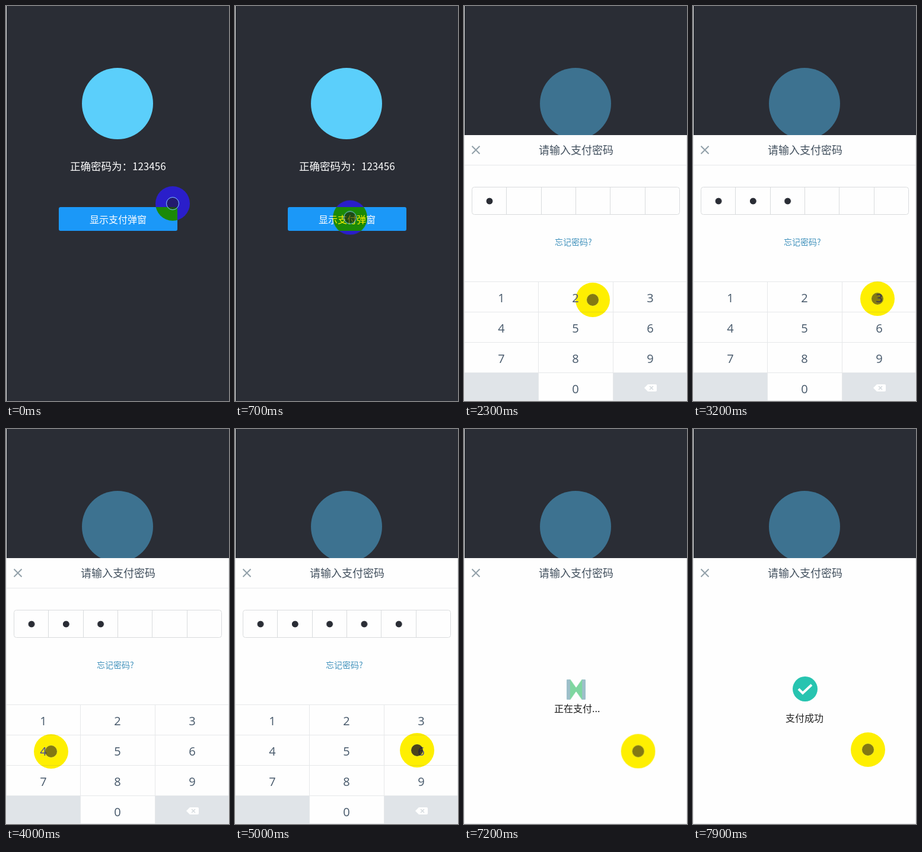
Write an HTML page that moves like this. It is 376 by 664 pixels and loops after 8000 ms.

```html
<!DOCTYPE html>
<html lang="zh-CN">
<head>
<meta charset="utf-8">
<title>支付密码</title>
<style>
html, body { margin: 0; width: 100%; height: 100%; overflow: hidden; background: #2a2d35; }
.stage {
  position: relative; width: 376px; height: 664px; overflow: hidden; isolation: isolate;
  background: #2a2d35; font-family: "Noto Sans CJK SC", "Noto Sans CJK", "Noto Sans", sans-serif;
}
.stage > *, .sheet > * { position: absolute; }
svg { left: 0; top: 0; display: block; }
.edge { left: 0; top: 0; width: 1px; height: 664px; background: #eceded; }
.mid { text-anchor: middle; }

.logo { fill: #5bcffb; animation: dim 8s linear infinite; }
@keyframes dim { 0%, 11.25% { fill: #5bcffb; } 13.5%, 100% { fill: #3d7290; } }

.sheet { inset: 0; animation: rise 8s infinite; }
@keyframes rise {
  0%, 11.25% { transform: translateY(447px); animation-timing-function: ease-out; }
  13.5%, 100% { transform: none; }
}
.line { fill: none; stroke: #e6e8ea; }
.keys { font: 20px "Open Sans", "Noto Sans", sans-serif; fill: #46586a; }

/* Each typed digit uncovers one more cell */
.dots {
  left: 14px; top: 322px; height: 12px;
  background: radial-gradient(circle at 29px 6px, #2a2d35 5px, transparent 5.8px) 0 0 / 58.3px 12px;
  animation: type 8s step-end infinite;
}
@keyframes type {
  0% { width: 0; }
  24.4% { width: 58.3px; }
  30.6% { width: 116.6px; }
  39.4% { width: 174.9px; }
  51.9% { width: 233.2px; }
  57.5% { width: 291.5px; }
  63.75%, 100% { width: 349.8px; }
}

.entry { animation: entry 8s step-end infinite; }
.paying { animation: paying 8s step-end infinite; }
.done { animation: done 8s step-end infinite; }
@keyframes entry { 0% { opacity: 1; } 66.25%, 100% { opacity: 0; } }
@keyframes paying { 0% { opacity: 0; } 66.25% { opacity: 1; } 91.25%, 100% { opacity: 0; } }
@keyframes done { 0% { opacity: 0; } 91.25%, 100% { opacity: 1; } }
.entry, .paying { inset: 0; }
.entry > *, .paying > * { position: absolute; }

.glass { left: 172px; top: 421px; animation: flip 1s linear infinite; }
@keyframes flip { from { transform: rotateY(-14deg); } to { transform: rotateY(166deg); } }

.halo, .touch { left: 0; top: 0; border-radius: 50%; animation: move 8s ease-in-out infinite; }
.halo { width: 58px; height: 58px; margin: -29px; background: #000fff; mix-blend-mode: difference; }
.touch { width: 20px; height: 20px; margin: -10px; }
.touch i { position: absolute; inset: 0; border-radius: 50%; }
.fill { background: rgb(30, 25, 35); animation: press 8s step-end infinite; }
.ring { border: 1.5px solid #7fc4ff; margin: -1px; animation: ring 8s step-end infinite; }
@keyframes ring { 0% { opacity: 1; } 11.25%, 100% { opacity: .15; } }
@keyframes press {
  0% { opacity: .55; }
  23.75% { opacity: .8; } 25% { opacity: .55; }
  30% { opacity: .8; } 31.25% { opacity: .55; }
  38.75% { opacity: .8; } 40% { opacity: .55; }
  51.25% { opacity: .8; } 52.5% { opacity: .55; }
  57% { opacity: .8; } 58.25% { opacity: .55; }
  62% { opacity: .8; } 63.75%, 100% { opacity: .55; }
}
@keyframes move {
  0%, 2.5% { transform: translate(281px, 332px); }
  10%, 17.5% { transform: translate(189px, 357px); }
  21.25% { transform: translate(66px, 453px); }
  23.1%, 25% { transform: translate(64px, 488px); }
  28.75% { transform: translate(217px, 494px); }
  30%, 31.9% { transform: translate(205px, 493px); }
  38.1%, 40.6% { transform: translate(311px, 492px); }
  50%, 52.5% { transform: translate(76px, 542px); }
  56.9%, 58.75% { transform: translate(194px, 542px); }
  62.5%, 65% { transform: translate(307px, 540px); }
  80% { transform: translate(292px, 545px); }
  98.75%, 100% { transform: translate(295px, 539px); }
}
</style>
</head>
<body>
<div class="stage">
  <svg width="376" height="664">
    <circle class="logo" cx="188" cy="164" r="60"/>
    <g fill="#fff">
      <text x="108" y="276" font-size="17.5">正确密码为：</text>
      <text x="213" y="276" font-size="17">123456</text>
      <rect x="89" y="338" width="200" height="40" rx="3" fill="#1b98f8"/>
      <text class="mid" x="189" y="365" font-size="16">显示支付弹窗</text>
    </g>
  </svg>
  <div class="edge"></div>

  <div class="sheet">
    <svg width="376" height="664">
      <rect y="217" width="376" height="447" fill="#fefefe"/>
      <path class="line" d="M.5 217V663.5H375.5V217" stroke="#dfe1e3"/>
      <path d="M13.5 235.5l13 13m0-13l-13 13" stroke="#93a1aa" stroke-width="2"/>
      <text class="mid" x="189" y="249" font-size="18" fill="#42505e">请输入支付密码</text>
    </svg>

    <div class="entry">
      <svg width="376" height="664">
        <path class="line" d="M0 267.5H376"/>
        <rect x="13.5" y="304.5" width="350" height="46" rx="4" fill="none" stroke="#d9dbdd"/>
        <path d="M71.5 305v45M130.5 305v45M188.5 305v45M246.5 305v45M305.5 305v45" stroke="#d9dbdd"/>
        <text x="153" y="402" font-size="14" fill="#4393bd">忘记密码?</text>
        <path d="M1 617H125V663H1ZM252 617H375V663H252Z" fill="#e0e4e8"/>
        <path class="line" d="M0 463.5H376M0 514.5H376M0 565.5H376M0 616.5H376M125.5 463V664M251.5 463V664"/>
        <g class="keys mid">
          <text x="63" y="498">1</text><text x="188" y="498">2</text><text x="314" y="498">3</text>
          <text x="63" y="549">4</text><text x="188" y="549">5</text><text x="314" y="549">6</text>
          <text x="63" y="600">7</text><text x="188" y="600">8</text><text x="314" y="600">9</text>
          <text x="188" y="651">0</text>
        </g>
        <path d="M304 642l6-6H323q2 0 2 2v8q0 2-2 2H310Z" fill="#fff"/>
        <path d="M313 639l6 6m0-6l-6 6" stroke="#d5dade" stroke-width="1.5"/>
      </svg>
      <div class="dots"></div>
    </div>

    <div class="paying">
      <svg class="glass" width="34" height="34">
        <path d="M7 4L27 30V4L7 30Z" fill="#7fd6a0" stroke="#7fd6a0" stroke-width="4"/>
        <path d="M3 2V32M31 2V32" stroke="#9dbfca" stroke-width="6" stroke-linecap="round"/>
      </svg>
      <svg width="376" height="664">
        <text x="152" y="476" font-size="16" fill="#1c1c1c">正在支付...</text>
      </svg>
    </div>

    <svg class="done" width="376" height="664">
      <circle cx="189" cy="437" r="21" fill="#27c4b0"/>
      <path d="M178 437l7 7 15-14" fill="none" stroke="#fff" stroke-width="4"/>
      <text class="mid" x="188" y="492" font-size="16" fill="#222">支付成功</text>
    </svg>
  </div>

  <div class="halo"></div>
  <div class="touch"><i class="fill"></i><i class="ring"></i></div>
</div>
</body>
</html>
```
